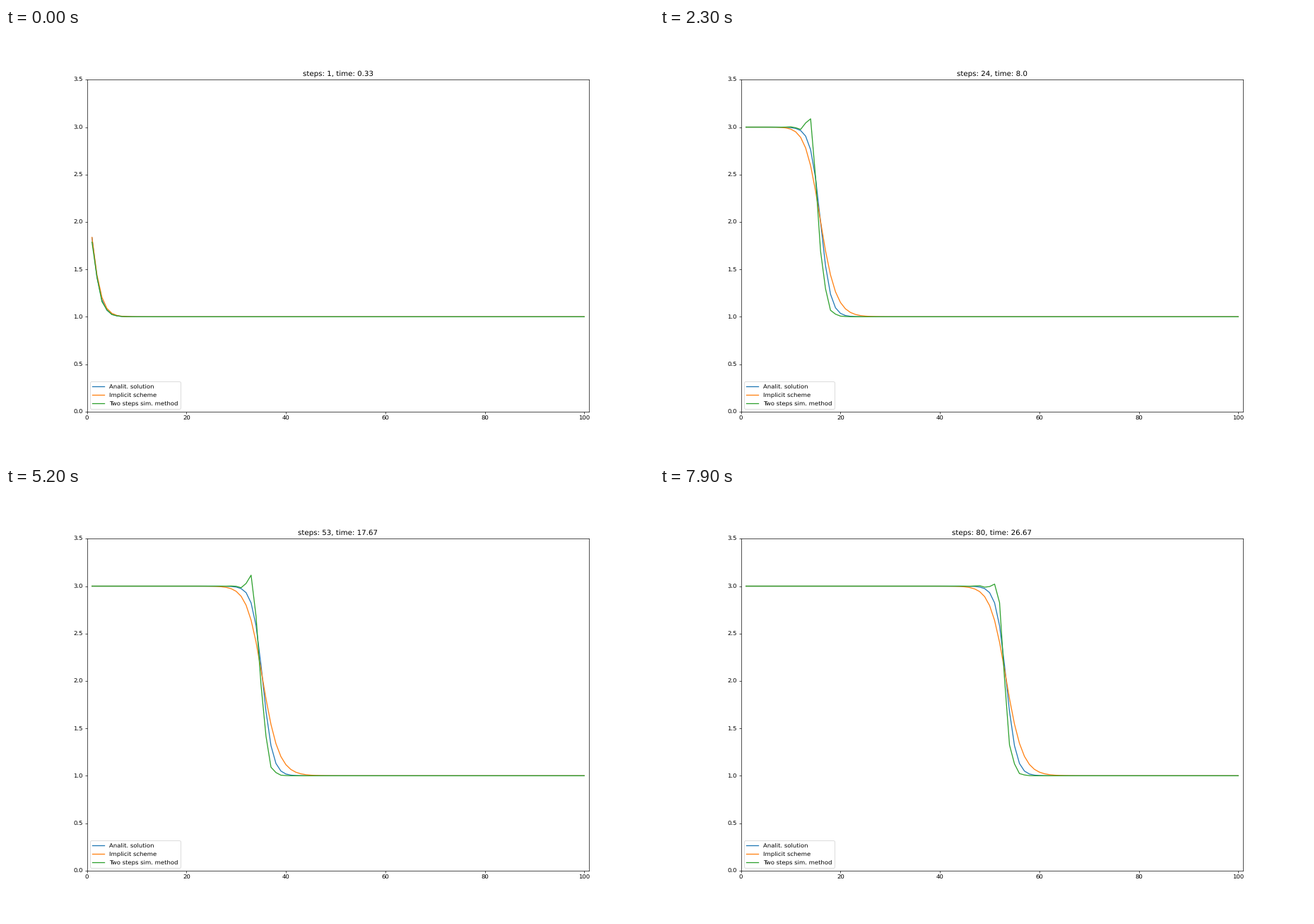
Recreate the animation shown at these times as a matplotlib script. Size 917 by 611 pixels, loop 8 s.

```python
import numpy as np
import matplotlib.pyplot as plt
from matplotlib.animation import FuncAnimation

plt.rcParams["text.hinting"] = "none"

WIDTH, HEIGHT = 917, 611
DPI = WIDTH / 15
STEPS = 80
TAU = 1 / 3          # time step; the grid step and viscosity are 1
X = np.arange(102)   # nodes 0 and 101 hold the boundary values
INNER = X[1:-1]


def exact(t):
    """Travelling wave of the Burgers equation u_t + u u_x = u_xx."""
    return 2 - np.tanh((X - 2 * t) / 2)


def implicit_step(old, edge):
    """Backward Euler with central differences, solved by Newton."""
    u = old.copy()
    u[0], u[-1] = edge[0], edge[-1]
    for _ in range(8):
        a, v, b = u[:-2], u[1:-1], u[2:]
        res = v - old[1:-1] + TAU * (v * (b - a) / 2 - (a + b - 2 * v))
        jac = (np.diag(1 + 2 * TAU + TAU * (b - a) / 2)
               + np.diag((TAU * (v / 2 - 1))[:-1], 1)
               + np.diag((-TAU * (v / 2 + 1))[1:], -1))
        u[1:-1] -= np.linalg.solve(jac, res)
    return u


def two_step(old, edge, n):
    """Explicit on nodes with the parity of n, then implicit on the rest."""
    u = old.copy()
    i = INNER[INNER % 2 == n % 2]
    a, b = old[i - 1], old[i + 1]
    u[i] = old[i] + TAU * (a + b - 2 * old[i] + old[i] * (a - b) / 2)
    u[0], u[-1] = edge[0], edge[-1]
    i = INNER[INNER % 2 != n % 2]
    a, b = u[i - 1], u[i + 1]
    u[i] = (old[i] + TAU * (a + b)) / (1 + 2 * TAU - TAU * (a - b) / 2)
    return u


def solve():
    imp = sym = exact(0)
    history = []
    for n in range(1, STEPS + 1):
        wave = exact(n * TAU)
        imp = implicit_step(imp, wave)
        sym = two_step(sym, wave, n)
        history.append((wave, imp, sym))
    return history


history = solve()

# the tiny margin keeps the pixel size from rounding down
fig, ax = plt.subplots(
    figsize=((WIDTH + 1e-6) / DPI, (HEIGHT + 1e-6) / DPI), dpi=DPI)
ax.set_xlim(0, 101)
ax.set_ylim(0, 3.5)
labels = ("Analit. solution", "Implicit scheme", "Two steps sim. method")
lines = [ax.plot(INNER, u[1:-1], label=label)[0]
         for u, label in zip(history[0], labels)]
ax.legend(loc="lower left")
title = ax.set_title("")


def draw(k):
    for line, u in zip(lines, history[k]):
        line.set_ydata(u[1:-1])
    title.set_text(f"steps: {k + 1}, time: {round((k + 1) * TAU, 2)}")
    return [*lines, title]


anim = FuncAnimation(fig, draw, frames=STEPS, interval=100, repeat=True,
                     repeat_delay=0, blit=False)
plt.show()
```
